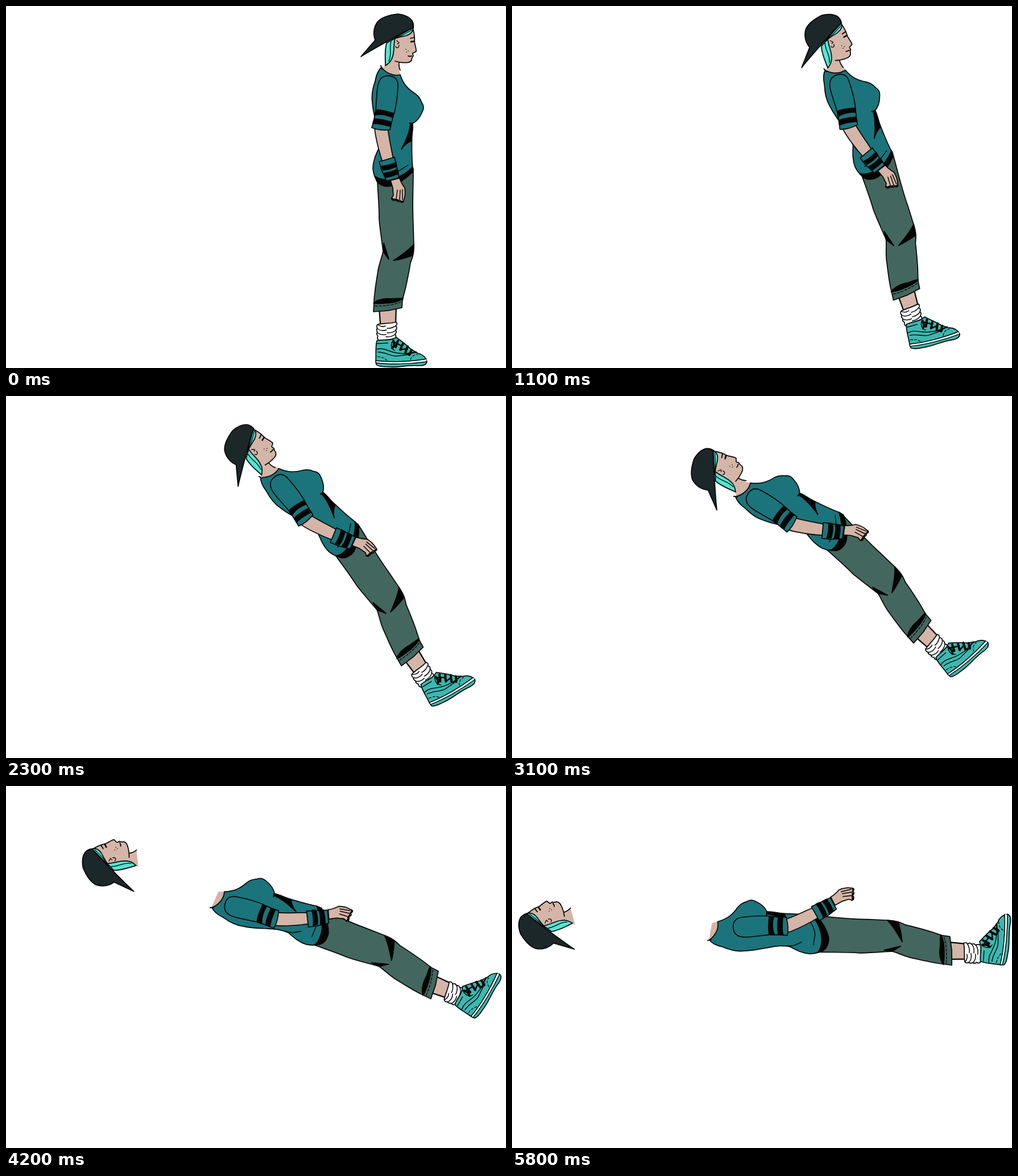
An HTML page with a canvas for the animation above (6.2 s loop, 879 px wide and 637 px high).

```html
<!DOCTYPE html>
<html lang="en">
<head>
<meta charset="utf-8">
<title>Falling figure</title>
<style>
html, body { margin: 0; width: 100%; height: 100%; overflow: hidden; background: #fff; }
canvas { display: block; }
</style>
</head>
<body>
<canvas id="stage" width="879" height="637"></canvas>
<script>
const ctx = document.getElementById("stage").getContext("2d");
const LOOP = 6200, STEP = 100, LAST = 5800, DETACH = 3300;
const TEAL = "#1b747b", PANTS = "#43675f", SKIN = "#d4b5a7", CAP = "#1b2728",
  HAIR = "#57e3d2", SHOE = "#3bb8b0", BLACK = "#050505", WHITE = "#fff";

const fill = (d, color) => { ctx.fillStyle = color; ctx.fill(new Path2D(d)); };
const line = (d, width = 1.7) => {
  ctx.strokeStyle = BLACK;
  ctx.lineWidth = width;
  ctx.stroke(new Path2D(d));
};
const shape = (d, color) => { fill(d, color); line(d); };
const dashed = (d, width = 1.3) => {
  ctx.setLineDash([4, 3]);
  line(d, width);
  ctx.setLineDash([]);
};

// Every part is drawn in the upright standing pose.
function drawLegs() {
  fill("M656 532L658 562L685 560L686 528Z", SKIN);
  line("M656 532L658 558M686 528L685 558", 2.2);
  shape("M654 560C664 558 677 559 686 556Q689 560 685 563Q689 567 685 570Q688 574 684 577Q687 582 684 587L656 589Q651 585 654 581Q650 577 653 574Q650 569 653 567Q650 563 654 560Z", WHITE);
  line("M654 561Q661 566 667 563M685 563Q677 568 670 567M653 568Q660 573 669 570M685 571Q678 576 670 575M653 575Q660 580 668 578M684 578Q677 583 668 582", 1.5);
  shape("M652 296L716 286C716 320 714 350 716 385L717 425C717 440 713 446 711 452C708 470 705 485 702 498L697 517L696 531L672 536L646 538L647 522C647 505 652 480 654 465C657 450 660 445 663 432C661 415 657 390 656 375C656 350 654 330 653 310Z", PANTS);
  shape("M664 417C667 428 671 438 673 446L663 432Z", BLACK);
  shape("M717 419C710 428 696 438 681 448C695 446 706 442 715 439Z", BLACK);
  shape("M646 523C652 517 665 514 675 515C685 516 692 513 698 515C692 520 680 522 668 523C658 524 651 524 646 523Z", BLACK);
  dashed("M649 528C665 528 681 526 694 521");
}

function drawShoe() {
  shape("M652 589C662 586 676 590 686 583C694 589 704 596 712 604L724 611C733 613 738 618 740 626C739 631 735 633 727 633C705 631 690 637 672 635C662 635 654 634 651 631L650 626C651 612 649 600 652 589Z", SHOE);
  fill("M651 625C675 628 710 627 739 622L739 626C710 630 675 631 651 628Z", WHITE);
  line("M651 624C675 627 710 626 739 621M651 628C675 631 710 630 739 626", 1.4);
  line("M653 594L671 593M652 604C662 601 670 606 677 608C687 612 695 611 705 612M654 609C668 609 674 616 686 616L712 613M680 588C676 596 676 602 683 606", 1.4);
  dashed("M711 622Q715 613 724 613M653 617Q665 618 670 624", 1.2);
  line("M681 589Q684 597 679 602M689 589L685 600M698 594L693 605M706 599L702 610M713 605L709 614", 4);
  line("M684 592L695 598M693 605L705 603M704 612L721 609", 2.5);
}

function drawTorso() {
  fill("M660 107L690 111L694 122L680 126L660 113Z", SKIN);
  const body = "M660 108C654 113 651 121 649 132C644 146 642 158 644 170C645 185 648 194 651 207C654 222 658 232 656 249C651 260 645 272 645 286C646 299 651 307 656 313C666 319 676 317 687 312C699 305 710 296 715 285C712 260 714 230 714 207C721 204 727 198 732 186C735 180 734 174 731 170C727 160 724 158 719 154C708 147 699 139 693 121C681 124 668 118 660 108Z";
  shape(body, TEAL);
  shape("M709 206L715 206C716 217 713 232 712 238C706 240 700 245 695 252C703 237 710 220 711 207Z", BLACK);
  shape("M648 299C656 306 670 306 680 304C695 300 706 293 715 283L714 293C704 303 690 313 676 317C665 319 656 314 652 309Z", BLACK);
  line("M707 280C695 287 690 292 679 293L661 291M657 243C656 255 660 262 665 270", 1.4);
  line("M659 105L661 111", 2);
}

function drawHead() {
  const profile = "M716 42C718 50 719 56 718 62C719 70 722 77 721 80C718 82 715 82 715 84L716 88C713 90 714 92 713 95C710 101 702 100 692 99";
  fill(profile + "C689 101 690 107 693 113L663 108C671 99 676 92 677 85L680 58Z", SKIN);
  line(profile + "L684 97M691 99Q690 106 693 113");
  shape("M669 65C665 80 667 92 667 105C673 101 678 97 680 88C683 80 681 68 684 57Z", HAIR);
  line("M677 62C673 76 679 84 673 97", 1.3);
  shape("M679 59C690 52 705 44 716 38C716 46 710 50 704 52C696 54 688 55 679 59Z", HAIR);
  line("M686 56C697 52 705 47 714 42", 1.2);
  shape("M624 89L649 60C645 50 646 38 653 28C660 20 672 16 688 14C700 15 709 19 714 26C717 32 717 36 715 39C704 43 690 51 678 58C660 68 640 79 624 89Z", CAP);
  line("M714 33Q718 36 715 40", 1.5);
  line("M687 61L691 65L688 67M685 71C686 75 691 74 691 69", 1.3);
  line("M711 57L718 55M707 88Q710 89 713 88", 1.8);
  line("M712 63L718 62", 2.6);
  for (const [x, y] of [[703, 76], [707, 79], [704, 81]]) {
    ctx.fillStyle = BLACK;
    ctx.fillRect(x - .5, y - .5, 1.3, 1.3);
  }
}

function drawForearm() {
  shape("M648 213C649 230 654 248 658 262L663 278L681 272C679 255 673 235 671 213Z", SKIN);
  shape("M676 307L680 320L681 333L678 338C678 343 684 343 686 341C688 345 691 346 693 342C695 348 699 346 699 342C702 335 702 326 701 320C698 316 694 310 692 303Z", SKIN);
  line("M688 324L686 340M693 324L692 341M697 323L697 341", 1.5);
  line("M678 338Q680 341 684 340M687 341L690 342M694 344L698 344", 2.6);
  shape("M656 274L683 266L686 280L691 302L669 308L660 288Z", TEAL);
  shape("M660 282Q673 281 686 275L687 282Q675 288 663 289Z", BLACK);
  shape("M664 294Q677 293 688 287L690 295Q679 300 667 302Z", BLACK);
}

function drawSleeve() {
  shape("M643 214C646 205 648 195 650 184L652 155C653 137 656 125 668 123C682 122 690 128 689 142C688 160 686 178 681 193C678 203 676 212 675 218C664 219 652 218 643 214Z", TEAL);
  shape("M650 183C660 182 672 186 682 189L679 196C668 191 658 190 648 192Z", BLACK);
  shape("M647 199C656 198 667 201 677 204L676 212C664 209 655 206 645 207Z", BLACK);
}

const TIMES = [0, 1100, 2300, 3100, 4200, 5000, 5800];
const elbowX = [659, 592, 527, 492, 475, 467, 483];
const elbowY = [216, 213, 219, 226, 235, 256, 247];

// A track holds the pivot's path and the part's rotation in degrees.
const parts = [
  { draw: drawLegs, pivot: [671, 534], x: [671, 693.5, 714, 721, 753, 760, 771],
    y: [534, 507, 458, 414.5, 350, 297, 290], a: [0, -16, -32.6, -44.7, -67, -84, -86] },
  { draw: drawShoe, pivot: [695, 632], x: [695, 744.5, 787.5, 805.5, 848.5, 859, 871.5],
    y: [632, 593, 525.5, 467, 372, 297, 271], a: [0, -12.5, -28, -39, -57, -69, -83] },
  { draw: drawTorso, pivot: [660, 108], x: [660, 550.5, 447.5, 393, 362, 347, 347],
    y: [108, 113, 143, 177, 214, 271, 271], a: [0, -22, -47.4, -64, -73.5, -87, -87] },
  { draw: drawHead, pivot: [672.5, 84.5], until: DETACH, times: [0, 1100, 2300, 3100, DETACH],
    x: [672.5, 553.5, 438.5, 377, 361.5], y: [84.5, 88, 121, 155, 164], a: [0, -19.4, -46, -64.4, -69] },
  { draw: drawHead, pivot: [672.5, 84.5], from: DETACH, times: [DETACH, 4200, 5000, 5800],
    x: [280, 207.5, 146, 85.5], y: [122, 140, 188, 245], a: [-98, -105.5, -111.3, -114.4] },
  { draw: drawForearm, pivot: [659, 216], x: elbowX, y: elbowY, a: [0, -23, -51, -68, -80, -91.5, -103] },
  { draw: drawSleeve, pivot: [659, 216], x: elbowX, y: elbowY, a: [0, -21.5, -45, -64, -82, -92.5, -100.5] }
];

// Smooth interpolation that never overshoots its keys.
function sample(times, values, t) {
  const slope = i => (values[i + 1] - values[i]) / (times[i + 1] - times[i]);
  const tangent = i => {
    if (i === 0) return slope(0);
    if (i === times.length - 1) return slope(i - 1);
    const a = slope(i - 1), b = slope(i);
    return a * b > 0 ? 2 * a * b / (a + b) : 0;
  };
  let i = 0;
  while (i < times.length - 2 && t >= times[i + 1]) i++;
  const span = times[i + 1] - times[i], u = (t - times[i]) / span, v = 1 - u;
  return v * v * (1 + 2 * u) * values[i] + u * u * (3 - 2 * u) * values[i + 1]
    + span * u * v * (v * tangent(i) - u * tangent(i + 1));
}

function render(t) {
  ctx.setTransform(1, 0, 0, 1, 0, 0);
  ctx.fillStyle = WHITE;
  ctx.fillRect(0, 0, 879, 637);
  ctx.lineCap = ctx.lineJoin = "round";
  for (const { draw, pivot, x, y, a, times = TIMES, from = 0, until = Infinity } of parts) {
    if (t < from || t >= until) continue;
    ctx.save();
    ctx.translate(sample(times, x, t), sample(times, y, t));
    ctx.rotate(sample(times, a, t) * Math.PI / 180);
    ctx.translate(-pivot[0], -pivot[1]);
    draw();
    ctx.restore();
  }
}

const start = performance.now();
function tick() {
  const time = Math.max(0, performance.now() - start) % LOOP;
  render(Math.min(LAST, Math.floor(time / STEP) * STEP));
  requestAnimationFrame(tick);
}
tick();
</script>
</body>
</html>
```
